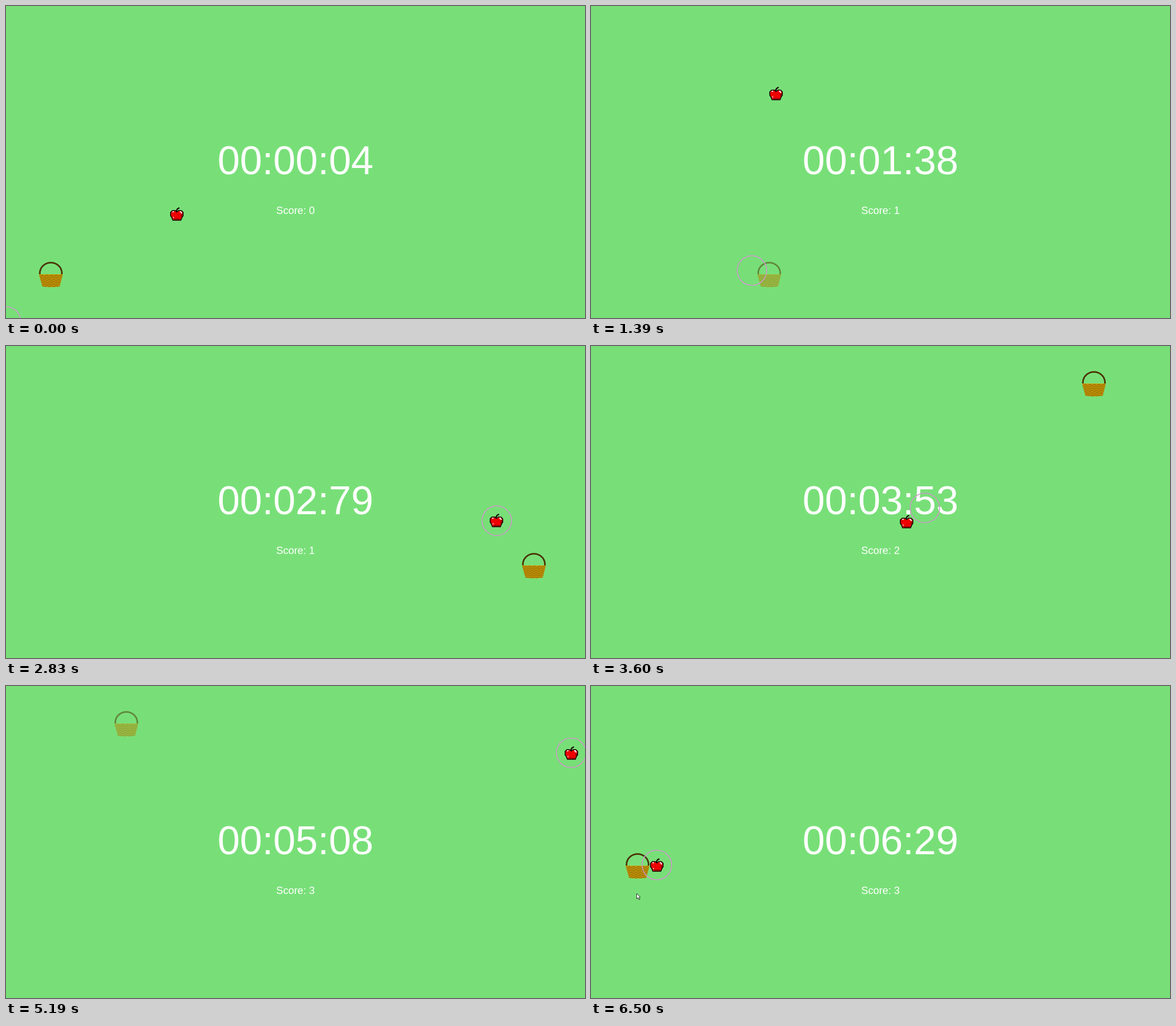
Recreate the animation shown at these times as an HTML page with a canvas. Size 1020 by 549 pixels, loop 6560 ms.

```html
<!DOCTYPE html>
<html lang="en">
<head>
<meta charset="utf-8">
<title>Apple catch</title>
<style>
html, body { margin: 0; width: 100%; height: 100%; overflow: hidden; background: #78df78; }
canvas { display: block; }
</style>
</head>
<body>
<canvas id="stage" width="1020" height="549"></canvas>
<script>
const ctx = document.getElementById('stage').getContext('2d');
const LOOP = 6560, TICK = 69.15, LAST = 94;
const WALK = 15.7, DASH = 42.4;
const FONT = 'Arial, "Liberation Sans", sans-serif';

// The basket leaves each corner at the given tick: [tick, x, y].
const corners = [
  [3.4, 79, 473], [12.5, 183, 473], [35.5, 930, 473],
  [49.7, 930, 67], [78.1, 85, 67], [100, 81, 400]
];
// Each delivery starts a dash: [tick, duration].
const dashes = [[19.5, 14.7], [42, 8], [63.3, 14.7]];
const spots = [[301, 366], [326, 154], [556, 309], [951, 109]];
const catches = [11, 31, 53, 72];

// The ring glides between pickups and deliveries: [tick, x, y, vx, vy].
const glide = [
  [0, 0, 555, 2, -2], [11, 301, 366, 27, -20], [20, 283.5, 465.5, 2, 48],
  [31, 334, 172, 14, -30], [42, 925, 330, 58, 20], [53, 560, 294, -18, 14],
  [63.3, 697, 76, 3.3, -12], [72, 938, 100, 36, 10], [84, 731, 122, -52, 5],
  [LAST, 116, 315, -50, 22]
];

const clamp = (v, lo, hi) => Math.min(hi, Math.max(lo, v));

function segment(keys, t) {
  let i = 0;
  while (i < keys.length - 2 && t >= keys[i + 1][0]) i++;
  return [keys[i], keys[i + 1]];
}

function travel(t) {
  return dashes.reduce((d, [at, span]) => d + (DASH - WALK) * clamp(t - at, 0, span), WALK * t);
}

function basketAt(t) {
  const [[t0, x0, y0], [, x1, y1]] = segment(corners, t);
  const u = clamp((travel(t) - travel(t0)) / Math.hypot(x1 - x0, y1 - y0), 0, 1);
  return [x0 + (x1 - x0) * u, y0 + (y1 - y0) * u];
}

function ringAt(t) {
  const [a, b] = segment(glide, t);
  const h = b[0] - a[0], u = (t - a[0]) / h;
  return [1, 2].map(k => {
    const m = a[k + 2] * h, n = b[k + 2] * h, d = b[k] - a[k];
    return a[k] + u * (m + u * (3 * d - 2 * m - n + u * (m + n - 2 * d)));
  });
}

// Hundredths; the clock lags a little near the end.
const clockAt = t => Math.floor(4.3 + 6.72 * t - 0.58 * Math.max(0, t - 82));

function sprite(w, h, paint) {
  const c = document.createElement('canvas');
  c.width = w;
  c.height = h;
  paint(c.getContext('2d'));
  return c;
}

const basket = sprite(42, 46, g => {
  g.strokeStyle = '#4a3000';
  g.lineWidth = 2.8;
  g.beginPath();
  g.ellipse(21, 20, 19.4, 18.4, 0, Math.PI, 0);
  g.lineTo(40.4, 22);
  g.moveTo(1.6, 20);
  g.lineTo(1.6, 22);
  g.stroke();

  g.beginPath();
  g.moveTo(0, 22);
  g.lineTo(42, 22);
  g.lineTo(36.5, 43.5);
  g.quadraticCurveTo(21, 46, 6, 43.5);
  g.closePath();
  g.fillStyle = '#cd9c08';
  g.fill();
  g.clip();
  g.strokeStyle = '#755400';
  g.lineWidth = 1;
  for (let y = 24.5; y < 45; y += 3.1) {
    g.beginPath();
    for (let x = 0; x <= 42; x++) g.lineTo(x, y + Math.sin(x * 0.78) * 0.9);
    g.stroke();
  }
});

const apple = sprite(24, 24, g => {
  const body = new Path2D('M12 8.5L9 6H4L1 9V15L3 18L5 23H19L21 18L23 15V9L20 6H15Z');
  const patch = (color, ...box) => {
    g.fillStyle = color;
    g.fillRect(...box);
  };
  g.fillStyle = '#ee0000';
  g.fill(body);
  patch('#a00000', 19, 12, 3, 5);
  patch('#a00000', 7, 20, 11, 2);
  patch('#ffd0d0', 4, 7, 3, 2);
  patch('#fff', 17, 7, 3, 2);
  patch('#fff', 19, 9, 2, 2);
  patch('#ffb0b0', 5, 17, 2, 2);
  g.strokeStyle = '#140000';
  g.lineWidth = 1.6;
  g.stroke(body);
  g.lineWidth = 2.2;
  g.stroke(new Path2D('M11.5 8V5.5L13 3L16.5 1'));
});

function label(text, size, y) {
  ctx.font = size + 'px ' + FONT;
  ctx.fillText(text, 510, y);
}

function place(img, x, y) {
  ctx.drawImage(img, Math.round(x - img.width / 2), Math.round(y - img.height / 2));
}

function pointer(x, y) {
  const arrow = new Path2D('M0 0V9.5L2.3 7.5L4 11L5.6 10.3L4 6.9H6.5Z');
  ctx.save();
  ctx.translate(x, y);
  ctx.fillStyle = '#fff';
  ctx.strokeStyle = '#222';
  ctx.lineWidth = 0.9;
  ctx.fill(arrow);
  ctx.stroke(arrow);
  ctx.restore();
}

function draw(tick) {
  ctx.fillStyle = '#78df78';
  ctx.fillRect(0, 0, 1020, 549);

  const score = dashes.filter(([at]) => tick >= at).length;
  const total = clockAt(tick);
  const pad = n => String(n).padStart(2, '0');
  ctx.fillStyle = '#fff';
  ctx.textAlign = 'center';
  label('00:' + pad(Math.floor(total / 100)) + ':' + pad(total % 100), 70.5, 296);
  label('Score: ' + score, 18.3, 366);

  const dashing = dashes.some(([at, span]) => tick >= at && tick < at + span);
  ctx.globalAlpha = dashing ? 0.5 : 1;
  place(basket, ...basketAt(tick));
  ctx.globalAlpha = 1;

  const ring = ringAt(tick);
  place(apple, ...(tick >= catches[score] ? ring : spots[score]));

  ctx.beginPath();
  ctx.arc(...ring, 26, 0, Math.PI * 2);
  ctx.strokeStyle = '#d095cc';
  ctx.lineWidth = 1.5;
  ctx.stroke();

  if (tick === LAST) pointer(80.5, 365);
}

const start = performance.now();

function run() {
  const t = (performance.now() - start) % LOOP;
  draw(Math.min(LAST, Math.floor(t / TICK + 0.2)));
  requestAnimationFrame(run);
}

run();
</script>
</body>
</html>
```
